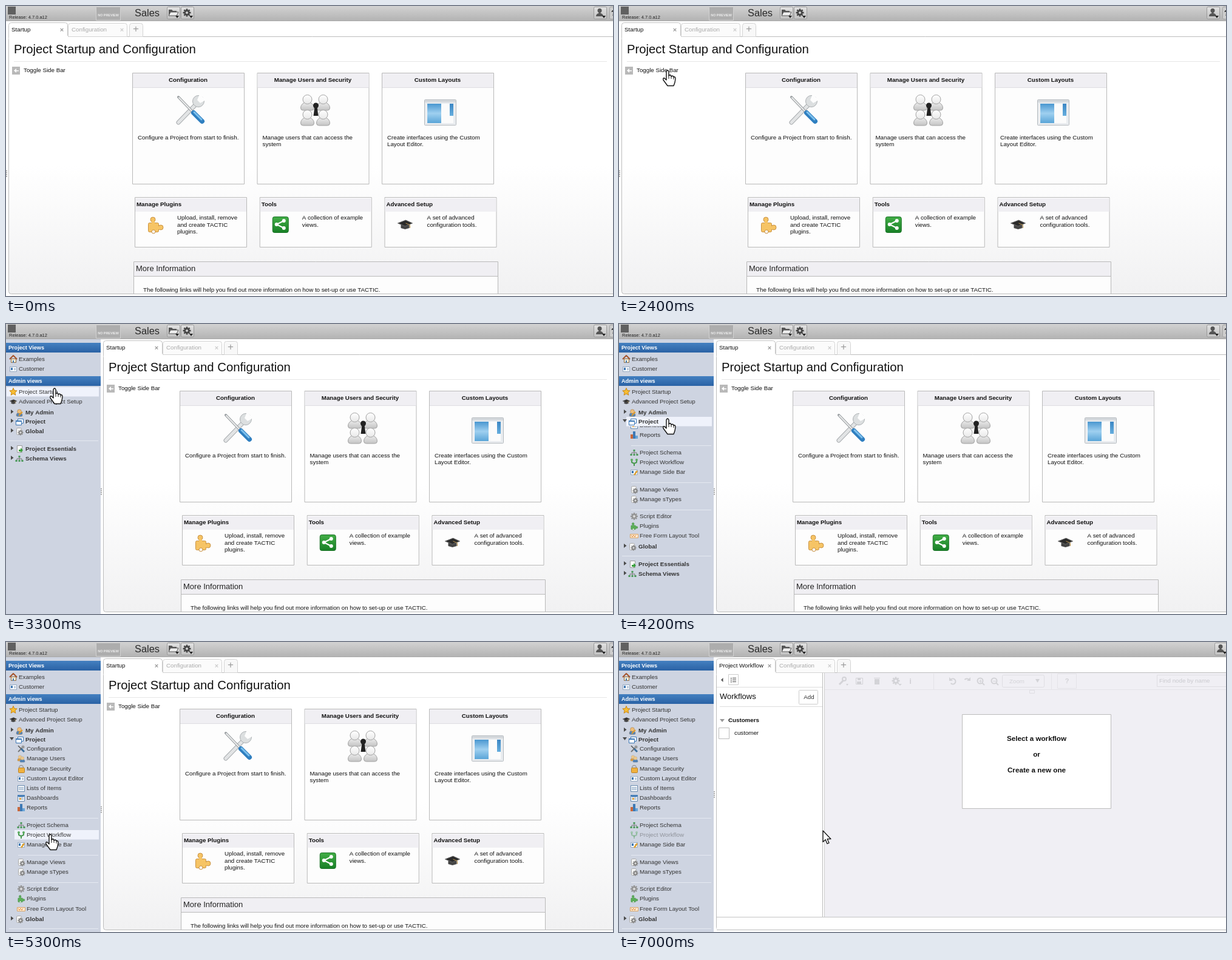
An HTML page with a canvas for the animation above (7.2 s loop, 1000 by 478 pixels).

```html
<!DOCTYPE html>
<html lang="en">
<head>
<meta charset="utf-8">
<title>Project startup</title>
<style>
html, body { margin: 0; width: 100%; height: 100%; overflow: hidden; background: #fff; }
canvas { display: block; }
</style>
</head>
<body>
<canvas id="stage" width="1000" height="478"></canvas>
<script>
const g = document.getElementById('stage').getContext('2d');
const LOOP = 7200, STEP = 100, SIDEBAR = 156, MENU_HEIGHT = 280;
const clamp = v => Math.max(0, Math.min(1, v));
const sine = v => (1 - Math.cos(Math.PI * clamp(v))) / 2;

// Baselines snap to whole pixels, like browser text.
function text(str, x, y, { size = 9.75, color = '#111', bold = false, align = 'left' } = {}) {
  g.font = `${bold ? 'bold ' : ''}${size}px "Liberation Sans", Arial, sans-serif`;
  g.fillStyle = color;
  g.textAlign = align;
  g.fillText(str, x, Math.round(y));
}
function rect(x, y, w, h, fill, stroke, r = 0) {
  g.beginPath();
  g.roundRect(stroke ? x + .5 : x, stroke ? y + .5 : y, w, h, r);
  if (fill) { g.fillStyle = fill; g.fill(); }
  if (stroke) { g.strokeStyle = stroke; g.lineWidth = 1; g.stroke(); }
}
function poly(points, fill, stroke, width = 1) {
  g.beginPath();
  for (let i = 0; i < points.length; i += 2) g.lineTo(points[i], points[i + 1]);
  if (fill) { g.closePath(); g.fillStyle = fill; g.fill(); }
  if (stroke) { g.strokeStyle = stroke; g.lineWidth = width; g.stroke(); }
}
function disc(x, y, r, fill, stroke, width = 1) {
  g.beginPath();
  g.arc(x, y, r, 0, 7);
  if (fill) { g.fillStyle = fill; g.fill(); }
  if (stroke) { g.strokeStyle = stroke; g.lineWidth = width; g.stroke(); }
}
function shade(y0, y1, ...colors) {
  const fill = g.createLinearGradient(0, y0, 0, y1);
  colors.forEach((c, i) => fill.addColorStop(i / (colors.length - 1), c));
  return fill;
}
function at(x, y, scale, draw) {
  g.save();
  g.translate(x, y);
  g.scale(scale, scale);
  draw();
  g.restore();
}
const hline = (x0, x1, y, color) => rect(x0, y, x1 - x0, 1, color);

function gear(color, r = 6, hole = '#ddd') {
  g.lineCap = 'butt';
  for (let i = 0; i < 4; i++) {
    const c = Math.cos(i * Math.PI / 4) * r, s = Math.sin(i * Math.PI / 4) * r;
    poly([-c, -s, c, s], null, color, r * .4);
  }
  disc(0, 0, r * .72, color);
  disc(0, 0, r * .32, hole);
}
function person(body, head = body, line = '#a2a2a2') {
  g.beginPath();
  g.roundRect(-11, 1, 22, 13, [9, 9, 4, 4]);
  g.fillStyle = body;
  g.fill();
  g.strokeStyle = line;
  g.lineWidth = 1;
  g.stroke();
  disc(0, -4, 7.5, head, line);
}

// Each icon is centred on the origin; sidebar icons fit a 12px box.
const icons = {
  tools() {
    g.lineCap = 'round';
    poly([-20, 21, 10, -10], null, '#a9adb0', 7);
    poly([-20, 21, 10, -10], null, '#e2e4e5', 5);
    disc(13, -14, 9.5, '#dcdfe0', '#adb1b4');
    poly([11, -16, 15, -26, 25, -16, 16, -11], '#fdfdfd');
    poly([-20, -21, 2, 2], null, '#9a9ea1', 4);
    poly([-19, -20, 2, 2], null, '#eceded', 2);
    poly([5, 5, 19, 19], null, '#2f7fc0', 8);
    poly([6, 4, 18, 16], null, '#7cbfec', 3);
    g.lineCap = 'butt';
  },
  users() {
    const silver = shade(-12, 14, '#fff', '#ececec', '#c4c4c4');
    for (const [x, y] of [[-13, -13], [13, -13], [-13, 12], [13, 12]])
      at(x, y, 1, () => person(silver));
    disc(1, -7, 4.5, '#222');
    poly([-1, -5, 3, -5, 5, 10, -3, 10], '#222');
  },
  layout() {
    rect(-26, -21, 52, 42, '#e9ecef', '#b4b9be', 1);
    rect(-25, -20, 51, 4, '#d5d9dd');
    rect(-22, -14, 44, 32, '#fbfbfb');
    rect(-21, -14, 23, 32, shade(-14, 18, '#4a97d0', '#9fd0f0', '#5aa5d8'));
    rect(16, -14, 6, 20, shade(-14, 6, '#3b86c4', '#66aede'));
  },
  puzzle(color = '#f6c465', line = '#c99243') {
    rect(-12, -3, 17, 15, color, line, 2);
    disc(-4, -8, 4, color, line);
    disc(9, 5, 4, color, line);
    rect(-6, -5, 5, 5, color);
    rect(3, 3, 4, 5, color);
    disc(-3, 12, 3, '#fdfdfd', line);
  },
  share() {
    rect(-13, -13, 26, 26, shade(-13, 13, '#43ae47', '#198127'), '#187325', 3);
    poly([6, -6, -6, 0, 6, 6], null, '#fff', 2);
    for (const [x, y] of [[6, -6], [-6, 0], [6, 6]]) disc(x, y, 3, '#fff');
  },
  cap() {
    poly([-7, 1, 7, 1, 7, 6, 0, 8, -7, 6], '#444');
    poly([-12, -2, 1, -7, 12, -2, 0, 3], '#2b2b2b', '#666');
    poly([1, -2, 8, 1, 8, 6], null, '#b9924a', 1);
  },
  home() {
    rect(-4, -1, 8, 6, '#f5ecd5', '#8b6a42');
    poly([-6, 0, 0, -6, 6, 0], null, '#a5532a', 2);
    rect(-1, 2, 2, 4, '#477bb0');
  },
  card() {
    rect(-6, -4, 11, 8, '#f8fbff', '#94a8bf');
    rect(-4, -2, 3, 4, '#3d76b1');
    hline(1, 4, -1, '#8da3ba');
    hline(1, 4, 1, '#8da3ba');
  },
  star() {
    const points = [];
    for (let i = 0; i < 10; i++) {
      const a = i * Math.PI / 5, r = i % 2 ? 3 : 6.5;
      points.push(Math.sin(a) * r, -Math.cos(a) * r);
    }
    poly(points, '#f7bd32', '#c98617');
  },
  admin() {
    at(0, 0, .45, () => person('#5285bb', '#efbf79', '#86643f'));
    poly([-1, 5, 5, -1], null, '#e09a27', 2);
  },
  windows() {
    rect(-3, -5, 9, 7, '#fff', '#3975b4');
    rect(-6, -2, 9, 7, '#fff', '#3975b4');
    rect(-6, -2, 10, 2, '#3975b4');
  },
  globe() {
    rect(-5, -6, 8, 11, '#f5f5f5', '#aaa', 2);
    at(2, 2, 1, () => gear('#888', 4.5));
  },
  gear: () => gear('#959595', 6),
  essentials() {
    rect(-4, -6, 8, 11, '#fff', '#999');
    poly([-1, 1, 2, 1, 2, -2, 6, 2, 2, 6, 2, 4, -1, 4], '#39a03c');
  },
  schema() {
    poly([-4, 4, -4, 0, 4, 0, 4, 4], null, '#777');
    poly([0, -3, 0, 4], null, '#777');
    for (const [x, y] of [[0, -4], [-5, 3], [0, 3], [5, 3]]) rect(x - 1.5, y - 1, 3, 3, '#4c9a5b');
  },
  lock() {
    disc(0, -2, 3.5, null, '#999', 1.5);
    rect(-5, -2, 10, 8, '#f0b13e', '#b98128', 1);
  },
  list() {
    rect(-6, -5, 11, 10, '#fff', '#6588ad');
    for (const y of [-2, 0, 2]) hline(-4, 4, y, '#87a4c2');
  },
  board() {
    icons.list();
    rect(-6, -5, 12, 3, '#477fb8');
    rect(-3, 0, 3, 3, '#e3a43c');
  },
  bars() {
    rect(-6, -1, 4, 7, '#c9693c');
    rect(-2, -6, 4, 12, '#3d79b5');
    rect(2, 1, 4, 5, '#69a5d8');
  },
  flow() {
    poly([-4, -3, -4, 0, 0, 2, 4, 0, 4, -3], null, '#4b9a52', 2);
    poly([0, 1, 0, 6], null, '#4b9a52', 2);
    disc(-4, -4, 2, '#5bac60');
    disc(4, -4, 2, '#5bac60');
  },
  edit() {
    icons.card();
    poly([0, 5, 5, -2], null, '#e1a02c', 2.5);
  },
  form() {
    rect(-7, -3, 13, 6, '#fbead5', '#dba362');
    poly([-5, -1, -3, 2, -1, -1, 1, 2, 3, -1], null, '#e18b37');
  },
  smallTools() {
    poly([-5, 5, 3, -3], null, '#777', 2);
    disc(3, -3, 2.5, '#999');
    poly([-5, -5, 0, 0], null, '#555', 1.5);
    poly([0, 0, 5, 5], null, '#3b6f9e', 3);
  },
  smallUsers() {
    at(-2, -1, .38, () => person('#d69a43', '#edc88a'));
    at(2, 1, .38, () => person('#4d80b5', '#edc88a'));
  },
  smallCap: () => at(0, 0, .5, icons.cap),
  smallPuzzle: () => at(0, 0, .45, () => icons.puzzle('#5bae58', '#397f3a')),
  user(color = '#555') {
    disc(0, -3.5, 3.5, color);
    g.beginPath();
    g.roundRect(-6, 1, 12, 5, [5, 5, 0, 0]);
    g.fillStyle = color;
    g.fill();
    rect(-1.5, -1, 3, 3, color);
  }
};

function barButton(x, draw) {
  rect(x, 1, 21, 20, shade(1, 22, '#e3e3e3', '#c0c0c0'), '#999', 2);
  at(x + 10, 11, 1, draw);
  poly([x + 14, 16, x + 20, 16, x + 17, 20], '#222');
}
function topBar(shift) {
  rect(0, 0, 1000, 25, shade(0, 25, '#d2d2d2', '#b2b2b2'));
  hline(0, 1000, 24, '#aaa');
  rect(3, 1, 13, 13, '#606060');
  text('Release: 4.7.0.a12', 5, 21, { size: 7.5, color: '#222' });
  rect(148, 1, 40, 22, '#adadad', '#d2d2d2');
  text('NO PREVIEW', 168.5, 17, { size: 5.4, color: '#eee', bold: true, align: 'center' });
  text('Sales', 212, 17, { size: 16.4, color: '#292929' });
  barButton(265, () => {
    poly([-7, 5, -7, -5, -2, -5, 0, -3, 6, -3, 6, 5], '#555');
    poly([-7, 5, -4, -1, 9, -1, 6, 5], '#eee', '#555');
  });
  barButton(288, () => gear('#444', 6.5, '#ccc'));
  barButton(968 + shift, icons.user);
  if (!shift) {
    rect(994, 1, 20, 20, '#cecece', '#a2a2a2', 2);
    text('?', 997, 16, { size: 12, bold: true });
  }
}

function tabs(x, title) {
  const faded = '#aaa';
  rect(x + 4, 50, 1040, 424, shade(50, 474, '#fff', '#fff', '#f1f1f2'), '#bcbcbc', 4);
  rect(x + 102, 28, 97, 22, '#fbfbfb', '#d4d4d4', [4, 4, 0, 0]);
  rect(x + 203, 28, 22, 22, '#f8f8f8', '#d4d4d4', [4, 4, 0, 0]);
  rect(x + 4, 27, 97, 25, '#fff', '#c2c2c2', [4, 4, 0, 0]);
  rect(x + 5, 49, 97, 5, '#fff');
  text(title, x + 9, 42);
  text('Configuration', x + 108, 42, { color: faded });
  text('×', x + 92, 43, { size: 11, color: '#999', align: 'center', bold: true });
  text('×', x + 191, 43, { size: 11, color: '#ccc', align: 'center', bold: true });
  text('+', x + 214, 43, { size: 17, color: '#999', align: 'center' });
}

const lines = (list, x, y) => list.forEach((s, i) => text(s, x, y + i * 11.3));
function bigCard(i, title, body, icon) {
  const x = 208 + i * 205.5;
  rect(x, 110, 184, 183, '#fdfdfd', '#b9b9b9');
  rect(x + 1, 111, 183, 23, '#f0eff3');
  hline(x + 1, x + 184, 134, '#dedee2');
  text(title, x + 92, 125, { bold: true, align: 'center' });
  at(x + 96, icon === icons.layout ? 175 : 171, 1, icon);
  lines(body, x + 9, 220);
}
function smallCard(i, title, body, icon, hover) {
  const x = 212 + i * 205.75;
  rect(x, 315, 184, 82, hover ? '#dcdcdc' : '#fdfdfd', '#b9b9b9');
  rect(x + 1, 317, 183, 22, hover ? '#e2e1e4' : '#f0eff3');
  text(title, x + 3, 330, { bold: true });
  at(x + 34, 360, 1, icon);
  lines(body, x + 70, 352.4);
}
function startup(side, hover) {
  tabs(side, 'Startup');
  text('Project Startup and Configuration', side + 13, 78, { size: 20.3 });
  hline(side + 13, 990, 91, '#e7e7e7');
  rect(side + 10, 100, 13, 13, '#b9b9b9');
  poly([side + 13, 106.5, side + 17, 103, side + 17, 110], '#fff');
  rect(side + 16, 106, 5, 1.5, '#fff');
  text('Toggle Side Bar', side + 29, 109);
  g.save();
  g.beginPath();
  g.rect(0, 50, 1000, 424);
  g.clip();
  g.translate(side / 2, 0);
  bigCard(0, 'Configuration', ['Configure a Project from start to finish.'], icons.tools);
  bigCard(1, 'Manage Users and Security', ['Manage users that can access the', 'system'], icons.users);
  bigCard(2, 'Custom Layouts', ['Create interfaces using the Custom', 'Layout Editor.'], icons.layout);
  smallCard(0, 'Manage Plugins', ['Upload, install, remove', 'and create TACTIC', 'plugins.'], () => icons.puzzle(), hover);
  smallCard(1, 'Tools', ['A collection of example', 'views.'], icons.share);
  smallCard(2, 'Advanced Setup', ['A set of advanced', 'configuration tools.'], icons.cap);
  rect(210, 421, 600, 80, '#fdfdfd', '#b9b9b9');
  rect(211, 422, 599, 24, '#f0eff3');
  hline(210, 811, 445, '#b9b9b9');
  text('More Information', 214, 437, { size: 13, color: '#222' });
  text('The following links will help you find out more information on how to set-up or use TACTIC.', 226, 471);
  g.restore();
}

function workflow() {
  const pale = '#d3d3d7', pane = '#f0eff4';
  tabs(SIDEBAR, 'Project Workflow');
  rect(161, 54, 839, 420, '#fff');
  rect(338, 51, 662, 403, pane);
  rect(335, 51, 1, 403, '#bbb');
  rect(338, 51, 1, 403, '#ccc');
  hline(161, 1000, 453, '#c4c4c4');
  hline(161, 1000, 474, '#bcbcbc');
  poly([171.5, 59, 171.5, 66, 168, 62.5], '#555');
  rect(180, 53, 16, 17, '#fff', '#ccc');
  for (const y of [59, 62, 65]) {
    rect(184, y, 1.5, 1.5, '#444');
    hline(187, 193, y, '#444');
  }
  hline(161, 335, 74, '#ddd');
  text('Workflows', 166, 94, { size: 13 });
  rect(296, 79, 31, 23, '#fff', '#ccc', 1);
  text('Add', 313, 94, { color: '#333', align: 'center' });
  hline(166, 335, 106, '#ddd');
  poly([166, 127, 174, 127, 170, 132], '#999');
  text('Customers', 180, 132, { bold: true });
  rect(164, 141, 17, 18, '#fff', '#bbb');
  text('customer', 190, 153);

  hline(339, 1000, 78, '#e4e3e8');
  for (const x of [518, 712]) rect(x, 52, 1, 26, '#e4e3e8');
  poly([363, 70, 370, 63], null, pale, 3);
  disc(371, 61, 3, null, pale, 2);
  poly([374, 69, 378, 69, 376, 72], pale);
  rect(390, 59, 11, 10, null, pale);
  rect(393, 59, 5, 4, pale);
  rect(392, 65, 7, 4, pale);
  rect(421, 61, 8, 9, pale);
  hline(420, 430, 59, pale);
  at(456, 64, 1, () => gear(pale, 6.5, pane));
  poly([460, 69, 466, 69, 463, 72], pale);
  text('i', 480, 69, { size: 13, color: pale, bold: true, align: 'center' });
  for (const [x, dir] of [[550, 1], [573, -1]]) {
    g.beginPath();
    g.arc(x, 65, 4.5, dir > 0 ? -2.4 : -.7, dir > 0 ? 2.4 : .7 + Math.PI, dir < 0);
    g.strokeStyle = pale;
    g.lineWidth = 2;
    g.stroke();
    poly([x - 6 * dir, 58, x - 6 * dir, 64, x, 64], pale);
  }
  for (const [x, plus] of [[595, 1], [618, 0]]) {
    disc(x, 64, 4.5, null, pale, 2);
    poly([x + 3, 67, x + 7, 71], null, pale, 2);
    hline(x - 2, x + 3, 64, pale);
    if (plus) rect(x, 62, 1, 5, pale);
  }
  rect(631, 54, 69, 20, null, '#dfdee3', 2);
  text('Zoom', 643, 68, { color: pale });
  poly([686, 61, 693, 61, 689.5, 67], pale);
  rect(722, 52, 31, 24, null, '#e4e3e8');
  text('?', 738, 68, { size: 11, color: pale, bold: true, align: 'center' });
  rect(886, 54, 130, 19, null, '#dfdee3');
  text('Find node by name', 890, 67, { color: '#cacacf' });
  rect(676, 79, 8, 5, null, '#dfdee3');
  rect(565, 119, 245, 155, '#fff', '#bcbcbc');
  ['Select a workflow', 'or', 'Create a new one'].forEach((s, i) =>
    text(s, 688, 163 + i * 26, { size: 11.7, bold: true, align: 'center' }));
}

const children = [
  [179, 'Configuration', 'smallTools'], [195, 'Manage Users', 'smallUsers'],
  [211.5, 'Manage Security', 'lock'], [228, 'Custom Layout Editor', 'card'],
  [244, 'Lists of Items', 'list'], [260, 'Dashboards', 'board'], [276, 'Reports', 'bars'], [290],
  [305, 'Project Schema', 'schema'], [321, 'Project Workflow', 'flow'], [337, 'Manage Side Bar', 'edit'], [351],
  [366, 'Manage Views', 'globe'], [382, 'Manage sTypes', 'globe'], [396],
  [410, 'Script Editor', 'gear'], [426, 'Plugins', 'smallPuzzle'], [442.5, 'Free Form Layout Tool', 'form']
];
function item(x, y, label, icon, pointer, { bold = false, dim = false } = {}) {
  if (!dim && pointer && pointer.y > y - 11.5 && pointer.y <= y + 4.5)
    rect(x - 20, y - 11, 173 - x, 15.5, '#eff2fb');
  g.globalAlpha = dim ? .4 : 1;
  at(x - (bold ? 10 : 9), Math.round(y) - 3, 1, icons[icon]);
  text(label, x, y, { bold, color: '#333' });
  g.globalAlpha = 1;
}
function folder(y, label, icon, pointer, open) {
  item(32, y, label, icon, pointer, { bold: true });
  poly(open ? [6, y - 7, 13, y - 7, 9.5, y - 2] : [8, y - 8, 12.5, y - 4.5, 8, y - 1], '#4b4b4b');
}
function sidebar(x, grow, pointer, dim) {
  g.save();
  g.beginPath();
  g.rect(0, 25, 1000, 453);
  g.clip();
  g.translate(x - SIDEBAR, 0);
  rect(0, 25, SIDEBAR, 453, '#ced4e1');
  [[31, 'Project Views'], [86, 'Admin views']].forEach(([y, label]) => {
    rect(0, y, SIDEBAR, 16, shade(y, y + 16, '#4480c0', '#2a62a5'));
    text(label, 4, y + 11, { size: 9.1, color: '#fff', bold: true });
  });
  item(21, 61, 'Examples', 'home', pointer);
  item(21, 77, 'Customer', 'card', pointer);
  item(21, 115, 'Project Startup', 'star', pointer);
  item(21, 131, 'Advanced Project Setup', 'smallCap', pointer);
  folder(149, 'My Admin', 'admin', pointer);
  const shift = MENU_HEIGHT * grow;
  if (grow > 0) {
    g.save();
    g.beginPath();
    g.rect(0, 168, SIDEBAR, shift);
    g.clip();
    const lift = shift - MENU_HEIGHT;
    for (const [y, label, icon] of children) {
      if (label) item(34, y + lift, label, icon, pointer, { dim: dim && icon === 'flow' });
      else hline(20, 152, y + lift, '#e5e9f1');
    }
    g.restore();
  }
  folder(164, 'Project', 'windows', pointer, grow > 0);
  folder(180 + shift, 'Global', 'globe', pointer);
  hline(5, 152, 192 + shift, '#e5e9f1');
  folder(209 + shift, 'Project Essentials', 'essentials', pointer);
  folder(225 + shift, 'Schema Views', 'schema', pointer);
  g.restore();
}

// time, x, y of the pointer tip
const path = [
  [450, 304, 480], [700, 290, 372], [900, 175, 247], [1600, 79, 106], [3400, 79, 106],
  [3800, 79, 156], [4400, 79, 156], [5200, 72, 317], [6200, 72, 317], [6800, 336, 311]
];
function pointerAt(t) {
  if (t < path[0][0]) return null;
  const next = path.findIndex(k => k[0] > t);
  if (next < 0) return { x: path.at(-1)[1], y: path.at(-1)[2] };
  const [t0, x0, y0] = path[next - 1], [t1, x1, y1] = path[next];
  const u = (t - t0) / (t1 - t0);
  const v = t < 900 ? u : t < 1600 ? 1 - (1 - u) ** 2 : sine(u);
  return { x: x0 + (x1 - x0) * v, y: y0 + (y1 - y0) * v };
}
function drawPointer({ x, y }, hand) {
  g.lineJoin = 'round';
  at(x, y, 1, () => {
    if (!hand) {
      poly([0, 0, 0, 18.5, 4.2, 14.8, 7, 21.5, 10, 20.2, 7.2, 13.7, 13, 13.7, 0, 0], '#fff', '#111', 1.3);
      return;
    }
    g.beginPath();
    g.moveTo(-1, 16);
    g.lineTo(-1, 2);
    g.quadraticCurveTo(1, -2, 3, 2);
    g.lineTo(3, 9);
    g.quadraticCurveTo(6, 6, 7, 10);
    g.quadraticCurveTo(10, 8, 11, 11);
    g.quadraticCurveTo(14, 10, 14, 14);
    g.lineTo(13, 20);
    g.lineTo(11, 25.5);
    g.lineTo(1, 25.5);
    g.lineTo(-6, 16);
    g.quadraticCurveTo(-7, 12, -4, 13);
    g.closePath();
    g.fillStyle = '#fff';
    g.fill();
    g.strokeStyle = '#111';
    g.lineWidth = 1.4;
    g.stroke();
    poly([3, 9, 3, 14], null, '#111');
    poly([7, 10, 7, 14], null, '#111');
    poly([11, 11, 11, 15], null, '#111');
  });
}

function render(now) {
  const t = Math.floor(now % LOOP / STEP) * STEP;
  const side = SIDEBAR * sine((t - 2650) / 400);
  const grow = sine((t - 3892) / 500);
  const pointer = pointerAt(t), loaded = t >= 5900;
  rect(0, 0, 1000, 478, '#fff');
  if (loaded) workflow();
  else startup(side, t >= 700 && t < 1000);
  if (side > 0) sidebar(side, grow, side === SIDEBAR && pointer.x < 154 ? pointer : null, t >= 5700);
  topBar(loaded ? 13 : 0);
  for (let i = 0; i < 4; i++) rect(side, (loaded ? 246 : 271) + i * 3, 2, 1.5, '#999');
  if (pointer) drawPointer(pointer, t > 1300 && pointer.x < 100);
  requestAnimationFrame(() => render(performance.now()));
}
render(performance.now());
</script>
</body>
</html>
```
